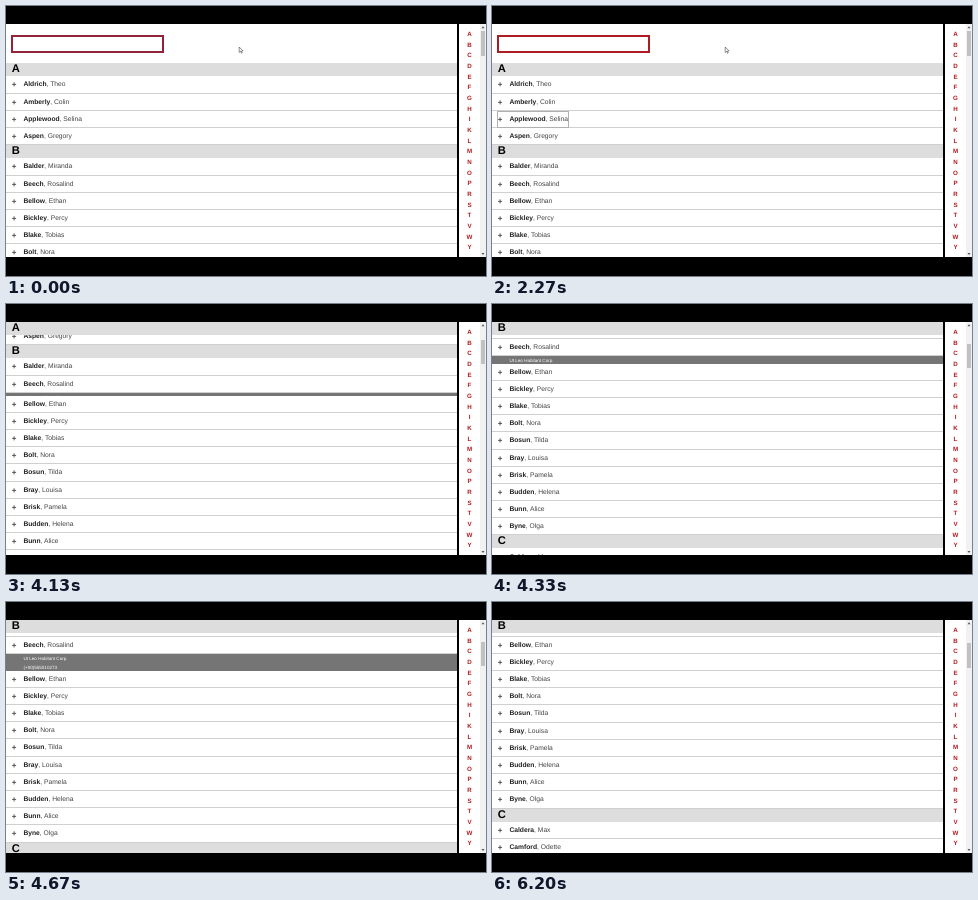
Recreate the animation shown at these times as an HTML page. Size 480 by 270 pixels, loop 6270 ms.

```html
<!DOCTYPE html>
<html lang="en">
<head>
<meta charset="utf-8">
<title>Contact list</title>
<style>
html, body { margin: 0; width: 100%; height: 100%; overflow: hidden; background: #000; }
#stage {
  position: relative; width: 480px; height: 270px; overflow: hidden;
  font: 6.73px "Liberation Sans", Arial, sans-serif; color: #444;
  text-rendering: geometricPrecision;
}
#list, #index, #bar { position: absolute; top: 18px; height: 233px; background: #fff; }
#list { left: 0; width: 451px; overflow: hidden; overflow-anchor: none; }
#list::after { content: ""; display: block; height: 300px; }
#search {
  margin: 11px 0 10.4px 5px; width: 153px; height: 18px;
  box-sizing: border-box; border: 2px solid #ad1c22;
}
#search.on { border-color: #932338; }
h2 {
  position: sticky; top: 0; z-index: 1; margin: 0; padding-left: 5.8px; height: 13.1px;
  background: #ddd; color: #000; font: bold 11.2px/13.1px "Liberation Sans", Arial, sans-serif;
}
.row {
  position: relative; height: 17.2px; line-height: 17.2px;
  box-sizing: border-box; border-bottom: 1px solid #d0d0d0;
}
.label { position: absolute; left: 5px; top: 0; height: 17.2px; padding: 0 .5px 0 12.4px; white-space: pre; }
.label i { position: absolute; left: .7px; font-style: normal; font-weight: bold; font-size: 8px; }
.label b { color: #222; }
.label.on { outline: 1px solid #b0b0b0; outline-offset: -1px; }
#panel {
  height: 0; overflow: hidden; padding-left: 17.5px;
  background: #757575; color: #fff; font-size: 4.55px; line-height: 9.6px;
}
#index {
  left: 453px; width: 21px; padding-top: 6.1px; height: 226.9px;
  color: #b3191f; font-weight: bold; font-size: 6.2px; line-height: 10.65px; text-align: center;
}
#bar { left: 474px; width: 6px; background: #f1f1f1; }
#thumb { position: absolute; left: 1px; top: 7px; width: 4px; height: 24.5px; background: #c1c1c1; }
#art { position: absolute; left: 0; top: 0; }
</style>
</head>
<body>
<div id="stage">
  <div id="list"><div id="search"></div></div>
  <div id="index"></div>
  <div id="bar"><div id="thumb"></div></div>
  <svg id="art" width="480" height="270">
    <path d="M475.5 22.3h3l-1.5-2zM475.5 247h3l-1.5 2z" fill="#555"/>
    <path id="cursor" d="M233.2 41v5.4l1.3-1.1.9 1.9.8-.4-.8-1.8h1.7z" fill="#fff" stroke="#444" stroke-width=".6"/>
  </svg>
</div>
<script>
const $ = id => document.getElementById(id);
const list = $("list");
const groups = {
  A: "Aldrich, Theo|Amberly, Colin|Applewood, Selina|Aspen, Gregory",
  B: "Balder, Miranda|Beech, Rosalind|Bellow, Ethan|Bickley, Percy|Blake, Tobias|Bolt, Nora|" +
     "Bosun, Tilda|Bray, Louisa|Brisk, Pamela|Budden, Helena|Bunn, Alice|Byne, Olga",
  C: "Caldera, Max|Camford, Odette"
};

function add(parent, tag, html, cls = "") {
  const el = document.createElement(tag);
  el.className = cls;
  el.innerHTML = html;
  parent.append(el);
  return el;
}

const labels = [];
for (const letter in groups) {
  const section = add(list, "section", "");
  add(section, "h2", letter);
  for (const name of groups[letter].split("|")) {
    const [last, first] = name.split(", ");
    const row = add(section, "div", "", "row");
    labels.push(add(row, "span", `<i>+</i><b>${last}</b>, ${first}`, "label"));
  }
}
const OPEN = 5, PANEL_HEIGHT = 20.5;
const panel = add(list, "div", "Ut Leo Habitant Corp.<br>(+00)555010273");
panel.id = "panel";
labels[OPEN].parentNode.after(panel);
$("index").innerHTML = [..."ABCDEFGHIKLMNOPRSTVWY"].join("<br>");

// [time, focused row]; -1 means no outline
const focus = [[730, 0], [1600, 1], [2270, 2], [2670, 3], [3000, 4], [3400, 5],
  [3870, -1], [5530, 6], [5800, -1]];

// Cosine ease from 0 to 1
function swing(t, start, length) {
  const p = Math.min(1, Math.max(0, (t - start) / length));
  return (1 - Math.cos(Math.PI * p)) / 2;
}

function draw() {
  const t = performance.now() % 6270;
  const current = focus.filter(f => f[0] <= t).pop();
  labels.forEach((el, i) => el.classList.toggle("on", !!current && current[1] === i));
  $("search").classList.toggle("on", t < 730);
  $("cursor").style.display = t < 3870 ? "" : "none";

  const leave = swing(t, 5790, 400);
  const scroll = 135 * swing(t, 3850, 430) + 17.2 * leave;
  panel.style.height = PANEL_HEIGHT * (swing(t, 3850, 1130) - leave) + "px";
  list.scrollTop = scroll;
  $("thumb").style.top = 7 + scroll * .108 + "px";
  requestAnimationFrame(draw);
}
draw();
</script>
</body>
</html>
```
